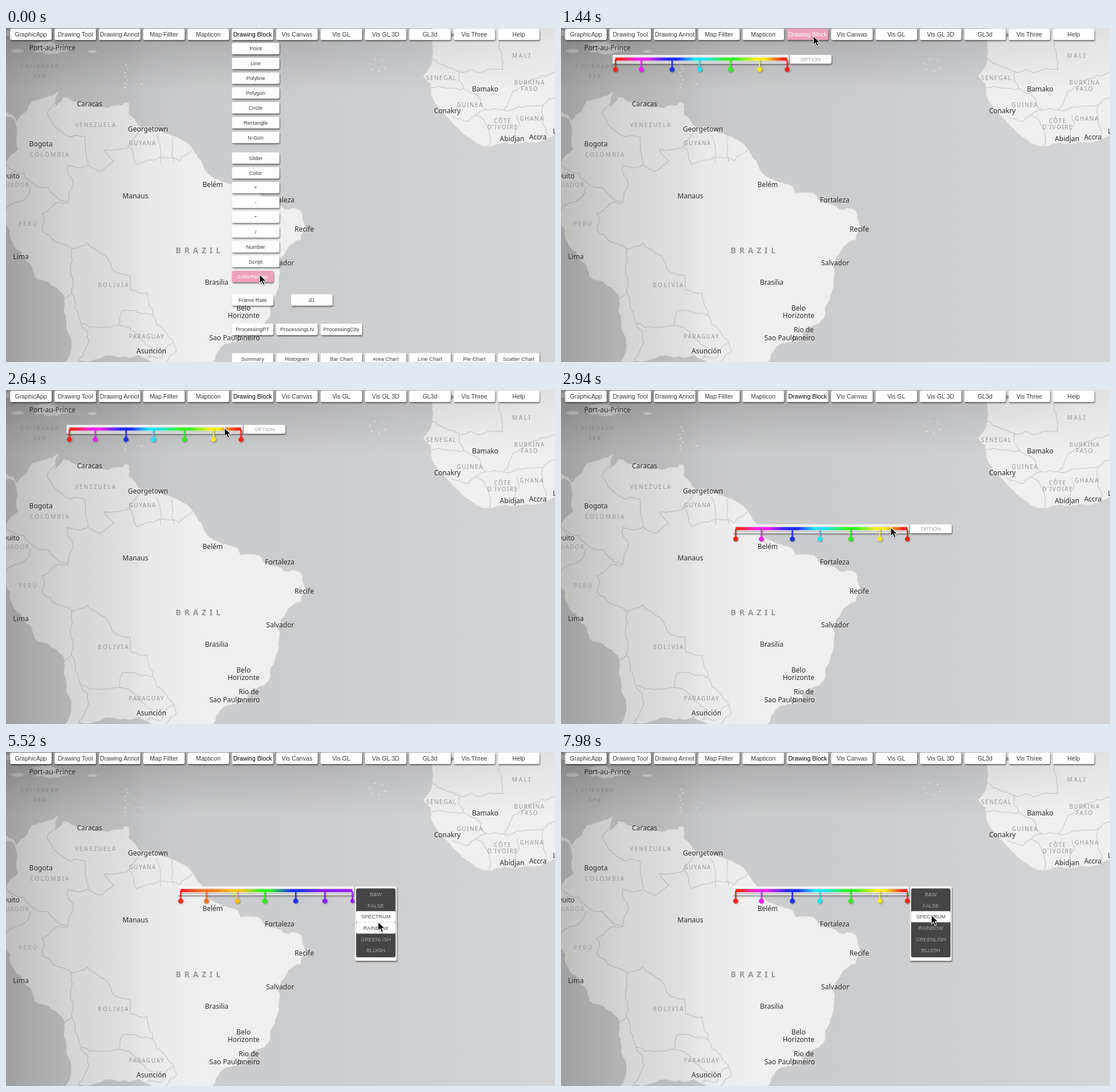
An HTML page that plays this animation: 959x584 px, repeating every 8 s.

```html
<!DOCTYPE html>
<html lang="en">
<head>
<meta charset="utf-8">
<title>Map colour remap</title>
<style>
  html, body { margin: 0; width: 100%; height: 100%; overflow: hidden; background: #cfd0d2; }
  svg { position: absolute; left: 0; top: 0; display: block; }
  text { text-anchor: middle; }
  .city { font: 12px "Noto Sans", "Open Sans", sans-serif; fill: #2e2e2e; }
  .land { font: 10px "Noto Sans", "Open Sans", sans-serif; fill: #989898; }
  .brazil { font-size: 14px; font-weight: 600; }
  .water { font-size: 11px; font-style: italic; fill: #858585; }
  .ui { font-family: "Liberation Sans", Arial, sans-serif; fill: #333; }
  .cards { filter: drop-shadow(1.5px 2px 1.3px rgba(0,0,0,.5)); }
  .ground { fill: #efefef; stroke: #e6e6e6; stroke-width: .8; stroke-linejoin: round; }
  .border { fill: none; stroke: #d2d3d4; stroke-width: 1.6; stroke-linejoin: round; }
</style>
</head>
<body>
<svg id="stage" width="959" height="584" viewBox="0 0 959 584">
  <defs>
    <linearGradient id="sea">
      <stop offset="0" stop-color="#cacbcc"/><stop offset=".5" stop-color="#cbccce"/>
      <stop offset="1" stop-color="#d3d4d6"/>
    </linearGradient>
    <linearGradient id="side">
      <stop offset="0" stop-opacity=".21"/><stop offset=".3" stop-opacity=".12"/>
      <stop offset=".63" stop-opacity=".065"/><stop offset=".72" stop-opacity=".03"/>
      <stop offset="1" stop-opacity="0"/>
    </linearGradient>
    <linearGradient id="top" x2="0" y2="1">
      <stop offset="0" stop-opacity=".2"/><stop offset=".3" stop-opacity=".13"/>
      <stop offset="1" stop-opacity="0"/>
    </linearGradient>
    <linearGradient id="fade">
      <stop offset="0" stop-color="#fff"/><stop offset=".55" stop-color="#ddd"/>
      <stop offset="1" stop-color="#444"/>
    </linearGradient>
    <mask id="topMask"><rect width="959" height="110" fill="url(#fade)"/></mask>
    <linearGradient id="ramp"></linearGradient>
  </defs>
  <rect width="959" height="584" fill="url(#sea)"/>
  <g id="map"></g>
  <rect width="340" height="584" fill="url(#side)"/>
  <rect width="959" height="110" fill="url(#top)" mask="url(#topMask)"/>
  <g id="labels"></g>
  <g id="widget"></g>
  <g id="menu" class="cards"></g>
  <g id="bar" class="cards"></g>
  <path id="cursor" d="M0 0V15.5L3.6 12.2L6.2 18.2L9 17L6.5 11.2H11.4Z" fill="#000" stroke="#fff" stroke-width="1.1"
    style="filter:drop-shadow(0 1px 1px rgba(0,0,0,.35))"/>
</svg>
<script>
const $ = id => document.getElementById(id);
const LOOP = 8000, STEP = 60;
const PINK = '#eda0bc';

// ---- map ----
let seed = 7;
const rnd = () => (seed = seed * 16807 % 2147483647) / 2147483647 - .5;

// Turns a few points into a ragged line by midpoint displacement.
function rough(text, amp) {
  const n = text.split(' ').map(Number);
  const out = [[n[0], n[1]]];
  const split = (a, b) => {
    const dx = b[0] - a[0], dy = b[1] - a[1];
    if (Math.hypot(dx, dy) < 9) return out.push(b);
    const k = rnd() * amp;
    const mid = [(a[0] + b[0]) / 2 - dy * k, (a[1] + b[1]) / 2 + dx * k];
    split(a, mid);
    split(mid, b);
  };
  for (let i = 2; i < n.length; i += 2) split([n[i - 2], n[i - 1]], [n[i], n[i + 1]]);
  return 'M' + out.map(p => p.map(v => v.toFixed(1))).join('L');
}

const america = '0 146 18 163 36 146 45 128 70 121 91 112 84 140 100 121 139 130 214 132 214 151 237 174 ' +
  '290 188 319 203 345 243 361 261 405 278 410 289 441 289 486 317 515 320 522 346 515 370 474 417 ' +
  '473 461 458 509 425 529 415 546 380 554 360 584 360 600 102 600 106 514 103 473 50 435 27 391 ' +
  '0 340 -9 330 -9 240 0 238 22 212 20 185 15 160 0 155';
const africa = '744 20 737 74 729 83 742 97 744 120 777 162 808 191 844 207 872 200 915 200 959 186 970 180 970 -9 748 -9 744 20';
const haiti = '46 27 78 23 124 38 103 41 49 42 66 31 46 27';
const northLines = ['91 113 72 149 94 179 138 190 143 240 108 240 108 305 63 325 63 354 115 386',
  '0 238 57 278 75 281 108 305', '0 318 33 298 44 278',
  '143 240 163 251 188 233 172 213 214 207 236 173', '212 205 228 239 258 231 303 232 327 211',
  '262 187 270 236', '292 189 293 234'];
const southLines = ['115 386 143 376 165 394 216 432 218 458 247 463 257 503 203 495 197 520',
  '115 386 117 438 115 464 103 473', '115 464 131 516 197 520 256 559 247 577 272 577 293 549 276 528 257 503',
  '131 516 143 533 126 584', '293 549 298 564 279 584'];
const africaLines = ['744 54 792 76 868 73 862 22', '792 76 800 106 741 104', '800 106 840 143 808 163 779 154',
  '819 151 846 190 844 207', '840 143 869 143 885 111 936 83 959 78', '869 143 894 137 938 135 945 190',
  '893 152 889 188 899 204', '938 135 959 122'];

const isle = (x, y, rx, ry) => `<ellipse class="ground" cx="${x}" cy="${y}" rx="${rx}" ry="${ry}"/>`;
let land = [[america, .28], [africa, .2], [haiti, .2]].map(a => `<path class="ground" d="${rough(...a)}"/>`).join('');
land += isle(20, 40, 11, 3) + isle(151, 41, 8, 2) + isle(15, 9, 25, 5) + isle(210, 134, 5, 4) + isle(237, 98, 1.5, 1);
for (let i = 0; i < 7; i++) land += isle(210 + 3 * Math.sin(i * 2), 65 + i * 6.5, 1.1, 1.3);
for (let i = 0; i < 6; i++) land += isle(649 + 14 * Math.cos(i + .4), 65 + 11 * Math.sin(i + .4), 1.2, 1);
for (const set of [northLines, southLines, africaLines])
  land += set.map(s => `<path class="border" d="${rough(s, .3)}"/>`).join('');
$('map').innerHTML = land;

const cities = [['Port-au-Prince', 81, 35], ['Caracas', 146, 133], ['Georgetown', 248, 177], ['Bogota', 61, 203],
  ['Quito', 8, 259], ['Manaus', 226, 294], ['Lima', 26, 400], ['Belém', 361, 274], ['Fortaleza', 478, 301],
  ['Recife', 521, 352], ['Salvador', 479, 411], ['Brasilia', 368, 445], ['Belo', 415, 490], ['Horizonte', 415, 503],
  ['Rio de', 424, 528], ['Janeiro', 424, 542], ['Sao Paulo', 383, 542], ['Asunción', 254, 565],
  ['Bamako', 837, 107], ['Conakry', 771, 145], ['Abidjan', 884, 194], ['Accra', 929, 191], ['Lomé', 971, 181]];
const countries = [['VENEZUELA', 156, 169, 2], ['COLOMBIA', 76, 221, 2.3], ['GUYANA', 238, 201, 1.3],
  ['ECUADOR', 12, 274], ['PERÚ', 38, 342, 2.2], ['BOLIVIA', 187, 449, 2.4], ['PARAGUAY', 245, 539],
  ['MALI', 900, 48, 2.6], ['SENEGAL', 760, 87], ['GUINEA', 810, 134], ['BURKINA', 914, 95],
  ['FASO', 914, 106], ['CÔTE', 867, 162], ["D'IVOIRE", 867, 173], ['GHANA', 918, 158]];
const spaced = (s, x, y, gap = 1.5, cls = '') =>
  `<text class="land ${cls}" x="${x + gap / 2}" y="${y + 3.6}" letter-spacing="${gap}">${s}</text>`;
$('labels').innerHTML =
  countries.map(c => spaced(...c)).join('') +
  spaced('BRAZIL', 335.5, 390, 5.7, 'brazil') +
  spaced('Caribbean', 58.5, 66, 2, 'water') + spaced('Sea', 58.5, 83, 2, 'water') +
  cities.map(([s, x, y]) => `<text class="city" x="${x}" y="${y + 4}">${s}</text>`).join('');

// ---- menu ----
const uiText = (s, x, y, size, extra = '') =>
  `<text class="ui" x="${x}" y="${y + size * .35}" font-size="${size}" ${extra}>${s}</text>`;
const buttons = [];
function addButton(parent, label, x, y, w = 72.5, size = 9.4) {
  const h = 19.8;
  const g = document.createElementNS('http://www.w3.org/2000/svg', 'g');
  g.innerHTML = `<rect x="${x}" y="${y - h / 2}" width="${w}" height="${h}" rx="2.5"/>` + uiText(label, x + w / 2, y, size);
  $(parent).append(g);
  const [rect, text] = g.children;
  buttons.push({ parent, rect, text, x, y, w, h, ink: label === 'Drawing Block' ? '#000' : '#3a3a3a' });
}
const col = i => 7.3 + i * 77.45;
const LEFT = col(5);
$('bar').innerHTML = uiText('A', 780, 12, 9);
['GraphicApp', 'Drawing Tool', 'Drawing Annot', 'Map Fillter', 'Mapticon', 'Drawing Block', 'Vis Canvas', 'Vis GL',
  'Vis GL 3D', 'GL3d', 'Vis Three', 'Help'].forEach((s, i) => addButton('bar', s, col(i), 11.2, 72.5, 10.6));
['Point', 'Line', 'Polyline', 'Polygon', 'Circle', 'Rectangle', 'N-Gon'].forEach((s, i) =>
  addButton('menu', s, LEFT, 36 + i * 25.9, 83));
['Slider', 'Color', '+', '-', '*', '/', 'Number', 'Script'].forEach((s, i) =>
  addButton('menu', s, LEFT, 227.4 + i * 25.85, 83));
addButton('menu', 'ColorRemap', LEFT, 434.5);
addButton('menu', 'Frame Rate', LEFT, 475.5);
addButton('menu', 'd1', 498, 475.5);
['ProcessingPT', 'ProcessingLN', 'ProcessingCity'].forEach((s, i) => addButton('menu', s, col(5 + i), 527));
['Summary', 'Histogram', 'Bar Chart', 'Area Chart', 'Line Chart', 'Pie Chart', 'Scatter Chart'].forEach((s, i) =>
  addButton('menu', s, col(5 + i), 578.5));

// ---- colour widget ----
const pins = [95, 140, 194, 242, 296, 347, 395];
const tint = (hue, sat) => pins.map((_, i) => `hsl(${hue},${sat}%,${10 + i * 13}%)`);
const wheel = hues => hues.map(h => `hsl(${h},90%,54%)`);
const palettes = [tint(0, 0), wheel([240, 265, 300, 340, 0, 30, 60]), wheel([2, 302, 236, 184, 115, 58, 2]),
  wheel([2, 25, 46, 115, 235, 269, 273]), tint(120, 75), tint(215, 75)];
const options = ['B&amp;W', 'FALSE', 'SPECTRUM', 'RAINBOW', 'GREENLISH', 'BLUISH'];
const rowY = i => 60.7 + i * 19.65;
$('widget').innerHTML = `
  <g class="cards">
    <rect x="90" y="47" width="308" height="15.5" rx="2" fill="#fff" fill-opacity=".85"/>
    <rect id="optionBox" x="399.5" y="47" width="73" height="15.5" rx="2.5" fill="#fff"/>
  </g>
  <rect x="95" y="58.6" width="302" height="1.6" fill="#b9b9b9"/>
  <rect x="95" y="51.6" width="300" height="5.6" fill="url(#ramp)"/>
  <g id="pins" style="filter:drop-shadow(1px 1.5px 1px rgba(0,0,0,.4))">${pins.map(x =>
    `<g><rect x="${x - 1.1}" y="55" width="2.2" height="16"/><circle cx="${x}" cy="72.5" r="4.3"/></g>`).join('')}</g>
  ${uiText('OPTION', 436, 55, 9.3, 'id="optionText" style="fill:#a2a2a2"')}
  <g id="list"><rect x="401.5" y="50.5" width="69" height="120.5" rx="3" fill="#454545"/>
  ${options.map((s, i) => `<g class="row"><rect x="401.5" y="${rowY(i) - 9.8}" width="69" height="19.6" rx="2.5" fill="#fff"/>` +
    uiText(s, 436, rowY(i) + .3, 9.1) + '</g>').join('')}</g>`;
const rows = [...document.querySelectorAll('.row')];

function paint(colors) {
  const stop = (x, c) => `<stop offset="${(x - 95) / 300}" stop-color="${c}"/>`;
  $('ramp').innerHTML = pins.map((x, i) => stop(x - 8, colors[i]) + stop(x + 9, colors[i])).join('');
  [...$('pins').children].forEach((g, i) => g.setAttribute('fill', colors[i]));
  $('pins').lastChild.lastChild.setAttribute('r', colors === palettes[3] ? 3.4 : 4.3);
}

// ---- timeline: time, x, y ----
const path = [[0, 443, 431], [300, 443, 431], [1020, 441, 14], [1920, 441, 14], [2100, 398, 115], [2400, 398, 115],
  [2520, 366, 52], [2580, 366, 52], [2940, 576, 240], [3180, 576, 240], [3540, 646, 242], [3840, 646, 242],
  [4080, 648, 246], [4500, 648, 247], [4800, 648, 267], [5100, 649, 287], [5520, 650, 297],
  [5700, 650, 306], [6120, 650, 306], [6360, 649, 326], [6900, 649, 346], [7200, 649, 346],
  [7560, 647, 289], [7800, 647, 289], [7980, 647, 285]];
const picks = [[4560, 0], [4860, 1], [5160, 2], [5460, 3], [6420, 4], [6960, 5], [7620, 2]];
const APPEAR = 240, CLOSE = 1260, GRAB = 2580, DROP = 2940, OPEN = 3900, LINGER = 120;

function cursorAt(t) {
  const i = path.findIndex(p => p[0] > t);
  if (i < 0) return path[path.length - 1].slice(1);
  const [t0, x0, y0] = path[i - 1], [t1, x1, y1] = path[i];
  let u = (t - t0) / (t1 - t0);
  u = u * u * (3 - 2 * u);
  return [x0 + (x1 - x0) * u, y0 + (y1 - y0) * u];
}
const show = (el, on) => { el.style.display = on ? '' : 'none'; };

let shown = null, last = -1;
function draw(t) {
  const [x, y] = cursorAt(t);
  $('cursor').setAttribute('transform', `translate(${x},${y})`);

  const menuOpen = t < CLOSE;
  show($('menu'), menuOpen);
  for (const b of buttons) {
    const live = b.parent === 'bar' || menuOpen;
    const hot = live && x >= b.x && x <= b.x + b.w && Math.abs(y - b.y) <= b.h / 2;
    b.rect.setAttribute('fill', hot ? PINK : '#fff');
    b.text.style.fill = hot ? '#fff' : b.ink;
  }

  show($('widget'), t >= APPEAR);
  const [gx, gy] = cursorAt(Math.min(Math.max(t, GRAB), DROP));
  $('widget').setAttribute('transform', `translate(${gx - 366},${gy - 52})`);

  const open = t >= OPEN;
  show($('list'), open);
  show($('optionText'), !open);
  $('optionBox').setAttribute('height', open ? 130 : 15.5);

  const done = picks.filter(p => p[0] <= t);
  const now = done[done.length - 1], before = done[done.length - 2];
  rows.forEach((g, i) => {
    const on = now && (i === now[1] || (before && i === before[1] && t < now[0] + LINGER));
    g.firstChild.setAttribute('fill-opacity', on ? 1 : 0);
    g.lastChild.style.fill = on ? '#4a4a4a' : '#a9a9a9';
  });
  const colors = palettes[now ? now[1] : 2];
  if (colors !== shown) paint(shown = colors);
}

const start = performance.now();
function tick() {
  const t = Math.floor((performance.now() - start) % LOOP / STEP) * STEP;
  if (t !== last) draw(last = t);
  requestAnimationFrame(tick);
}
tick();
</script>
</body>
</html>
```
